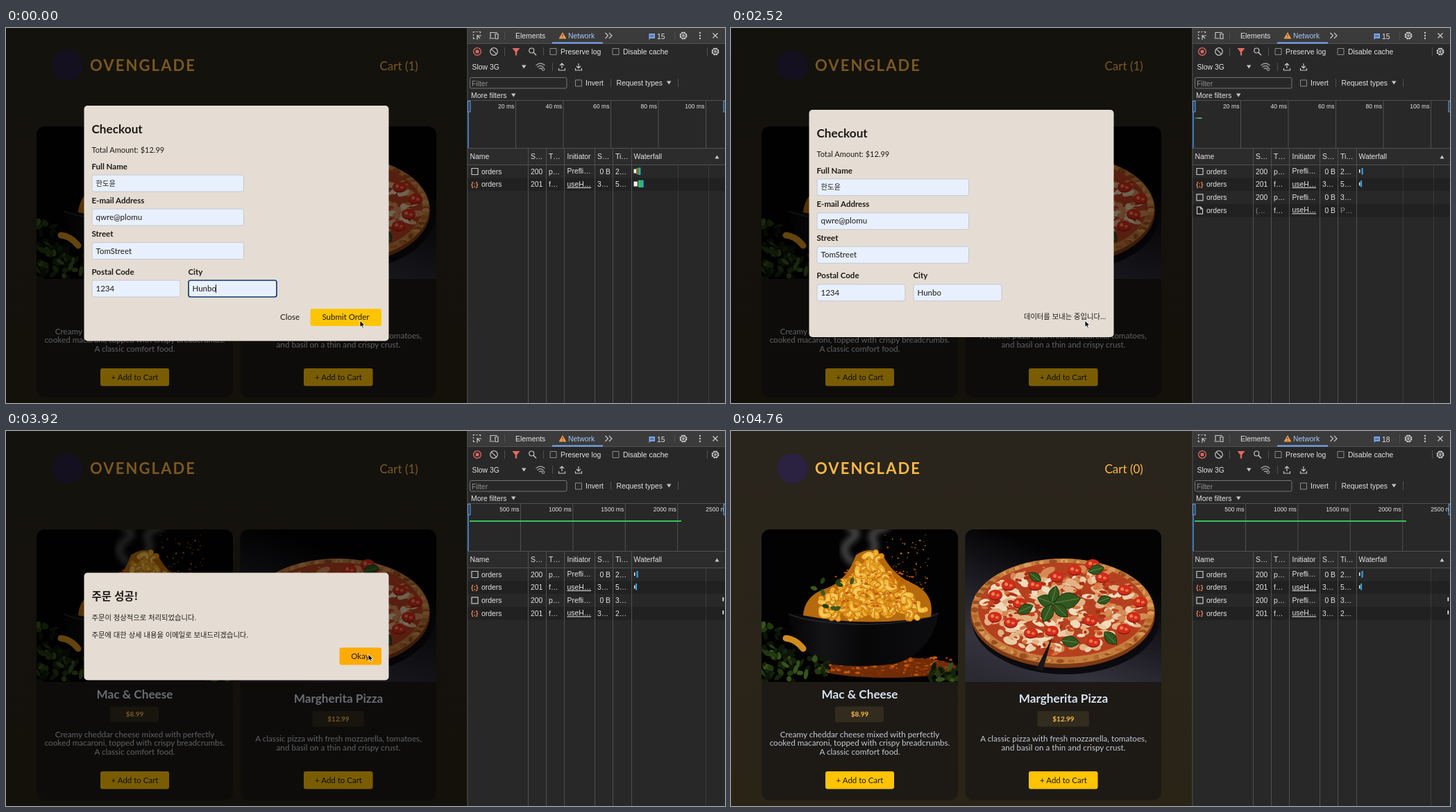
These frames come from a looping animation (1036x541 px, 5110 ms). An HTML page:

```html
<!DOCTYPE html>
<html lang="ko">
<head>
<meta charset="utf-8">
<title>Checkout</title>
<style>
html, body { margin: 0; width: 100%; height: 100%; overflow: hidden; background: #282828; }
svg { display: block; width: 1036px; height: 541px; }
.shop { font: 11.5px Lato, "Noto Sans CJK KR", sans-serif; fill: #d9e2f1; }
.shop .dark { fill: #1d1a16; }
.ko { font-family: "Noto Sans CJK KR", "Noto Sans CJK", sans-serif; font-size: 10.3px; }
.b { font-weight: 700; }
.h { font-size: 17.2px; font-weight: 700; }
.mid { text-anchor: middle; }
.end { text-anchor: end; }
.gold { fill: #ffb847; }
.btn { fill: #ffc404; }
.hover { fill: #ffab06; }
.field { fill: #e8f0fe; stroke: #c5c8ce; }
.dev { font: 10.4px "Liberation Sans", Arial, sans-serif; fill: #e3e3e3; }
.ms { font-size: 8.6px; text-anchor: end; }
.dim { fill: #8f8f8f; }
.ico { fill: none; stroke: #c7c7c7; stroke-width: 1.2; }
.rule { fill: none; stroke: #505050; }
</style>
</head>
<body>
<svg viewBox="0 0 1036 541">
  <defs>
    <linearGradient id="page" x2="0" y2="1"><stop stop-color="#29251c"/><stop offset="1" stop-color="#2a2417"/></linearGradient>
    <linearGradient id="table" x1=".55" y1=".2" x2=".15" y2="1"><stop stop-color="#030304"/><stop offset=".75" stop-color="#34333e"/><stop offset="1" stop-color="#2b2a33"/></linearGradient>
    <linearGradient id="bowl"><stop stop-color="#050506"/><stop offset=".25" stop-color="#141417"/><stop offset=".5" stop-color="#070708"/><stop offset="1" stop-color="#0d0d10"/></linearGradient>
    <filter id="soft"><feGaussianBlur stdDeviation="4"/></filter>
    <clipPath id="pic1"><path d="M44 362V154a12 12 0 0 1 12-12H315a12 12 0 0 1 12 12V362z"/></clipPath>
    <clipPath id="pic2"><path d="M337.500 362V154a12 12 0 0 1 12-12H608a12 12 0 0 1 12 12V362z"/></clipPath>
    <clipPath id="left"><path d="M0 0H664.500V541H0z"/></clipPath>
  </defs>

  <g class="shop" clip-path="url(#left)">
    <rect width="665" height="541" fill="url(#page)"/>
    <circle cx="88.500" cy="54" r="22" fill="#2b2140"/>
    <text class="gold b" x="121" y="62" font-size="22" letter-spacing="2.1">OVENGLADE</text>
    <text class="gold" x="538.500" y="61" font-size="17" id="cart"></text>

    <rect x="44" y="142" width="283" height="391" rx="12" class="dark"/>
    <rect x="337.500" y="142" width="282.500" height="391" rx="12" class="dark"/>
    <g id="mac" clip-path="url(#pic1)"></g>
    <g id="pizza" clip-path="url(#pic2)"></g>

    <g class="mid">
      <text class="h" x="185.500" y="385.500">Mac &amp; Cheese</text>
      <rect x="150" y="397.500" width="70" height="22.500" rx="3" fill="#312c1d"/>
      <text class="gold b" x="185.500" y="412.300" font-size="10">$8.99</text>
      <g font-size="11.7" fill-opacity=".88">
        <text x="185.500" y="441.500">Creamy cheddar cheese mixed with perfectly</text>
        <text x="185.500" y="454.200">cooked macaroni, topped with crispy breadcrumbs.</text>
        <text x="185.500" y="467">A classic comfort food.</text>
        <text x="479" y="448">A classic pizza with fresh mozzarella, tomatoes,</text>
        <text x="479" y="460.700">and basil on a thin and crispy crust.</text>
      </g>
      <rect class="btn" x="136" y="491" width="99" height="25.500" rx="3"/>
      <text class="dark" x="185.500" y="508">+ Add to Cart</text>
      <text class="h" x="479" y="392">Margherita Pizza</text>
      <rect x="441.500" y="404" width="74.500" height="22.500" rx="3" fill="#312c1d"/>
      <text class="gold b" x="479" y="418.800" font-size="10">$12.99</text>
      <rect class="btn" x="429" y="491" width="99.500" height="25.500" rx="3"/>
      <text class="dark" x="479" y="508">+ Add to Cart</text>
    </g>

    <rect id="shade" width="665" height="541" opacity=".52" fill="#000"/>

    <g id="checkout">
      <rect id="sheet" x="112.500" width="439" rx="5" fill="#e5ddd4"/>
      <g id="form">
        <g class="dark">
          <text class="h" x="123.500" y="152">Checkout</text>
          <text x="123.500" y="180" font-size="11">Total Amount: $12.99</text>
          <g class="b">
            <text x="123.500" y="204">Full Name</text>
            <text x="123.500" y="252.500">E-mail Address</text>
            <text x="123.500" y="301.300">Street</text>
            <text x="123.500" y="355.500">Postal Code</text>
            <text x="262.500" y="355.500">City</text>
          </g>
        </g>
        <g class="field">
          <rect x="124" y="212" width="218.500" height="24" rx="3"/>
          <rect x="124" y="261" width="218.500" height="24" rx="3"/>
          <rect x="124" y="309.500" width="218.500" height="24" rx="3"/>
          <rect x="124" y="364" width="127" height="24" rx="3"/>
          <rect x="263" y="364" width="127" height="24" rx="3"/>
        </g>
        <g class="dark">
          <text class="ko" x="129.500" y="227.500">한도윤</text>
          <text x="129.500" y="276.700">qwre@plomu</text>
          <text x="129.500" y="325.500">TomStreet</text>
          <text x="129.500" y="380">1234</text>
          <text x="268.500" y="380">Hunbo</text>
        </g>
      </g>
      <g id="actions" class="mid">
        <rect x="263" y="364" width="127" height="24" rx="3" fill="none" stroke="#173f73" stroke-width="1.700"/>
        <path d="M302.500 370v12" stroke="#111"/>
        <text class="dark" x="409" y="421.300">Close</text>
        <rect id="submit" x="438.500" y="405" width="102.500" height="25" rx="3"/>
        <text class="dark" x="489.500" y="421.300">Submit Order</text>
      </g>
      <text id="sending" class="ko dark end" x="540.500" y="420.300">데이터를 보내는 중입니다...</text>
    </g>

    <g id="success">
      <rect x="112.500" y="204.500" width="439" height="155" rx="5" fill="#e5ddd4"/>
      <text class="ko dark b" x="123.500" y="244" style="font-size:15.400px">주문 성공!</text>
      <text class="ko dark" x="123.500" y="273">주문이 정상적으로 처리되었습니다.</text>
      <text class="ko dark" x="123.500" y="297.600">주문에 대한 상세 내용을 이메일로 보내드리겠습니다.</text>
      <rect id="okay" x="480.500" y="312.500" width="60.500" height="25" rx="3"/>
      <text class="dark mid" x="510.500" y="328.800">Okay</text>
    </g>
  </g>

  <g class="dev">
    <rect x="664.500" width="372" height="541" fill="#282828"/>
    <path d="M664.500 0H1036V22.500H664.500z" fill="#3b3b3b"/>
    <path d="M664.500 174H1036V197.500H664.500z" fill="#2c2c2c"/>
    <path class="rule" d="M665 0V541M665 22.500H1036M665 104.500H1036M665 173.500H1036M665 197.500H1036M718.500 5V17M963.500 5V17M718.500 28V40M774.500 28V40M1010.500 28V40M787.500 50V62M871.500 73V85M968.500 73V85"/>
    <path d="M787 21.500H860" stroke="#7cacf8" stroke-width="2"/>

    <g class="ico">
      <path d="M683 15l-4-4v6M679 11h6M673.500 7v-1.500h2m2 0h2m2 0h2v2M673.500 9v2m0 2v2.500h2"/>
      <path d="M698 14V6.500h10M696.500 15h7M705 8.500h4v7h-4z"/>
      <path d="M863.500 7l4 4-4 4M869 7l4 4-4 4"/>
      <circle cx="976" cy="11" r="4.500" stroke-width="2" stroke-dasharray="2.500 1"/><circle cx="976" cy="11" r="3.800"/><circle cx="976" cy="11" r="1.300"/>
      <circle cx="1022" cy="34" r="4.500" stroke-width="2" stroke-dasharray="2.500 1"/><circle cx="1022" cy="34" r="3.800"/><circle cx="1022" cy="34" r="1.300"/>
      <path d="M1018.500 7.500l7 7m0-7l-7 7" stroke-width="1.400"/>
      <circle cx="703" cy="34" r="5.300"/><path d="M699.300 30.300l7.400 7.400"/>
      <circle cx="757.300" cy="32.500" r="3.500"/><path d="M760 35.200l4 4" stroke-width="1.500"/>
      <path d="M763.500 54q6.500-6 13 0M765.500 56.500q4.500-4 9 0M768 59q2-2 4 0" stroke="#999"/><circle cx="774" cy="59.500" r="1.800" stroke="#999"/>
      <path d="M801 58v-7m-3 3l3-3 3 3M796.500 58v3h9v-3M825 51v7m-3-3l3 3 3-3M820.500 58v3h9v-3"/>
      <path d="M784 29.500h9v9h-9zM874 29.500h9v9h-9zM820.500 75h9v9h-9z" stroke="#8b8b8b" stroke-width="1"/>
    </g>
    <g fill="#c7c7c7"><circle cx="1000" cy="7" r="1.200"/><circle cx="1000" cy="11" r="1.200"/><circle cx="1000" cy="15" r="1.200"/>
      <path d="M743 53.500h6.500l-3.250 5zM952 76.500h6.500l-3.250 5zM728 94.500h6.500l-3.250 5zM1021.500 188.500h6l-3-5z"/></g>
    <path d="M802 6l5.500 9.500h-11z" fill="#f29b4b"/><path d="M802 9v3m0 1v1" stroke="#3a3a3a"/>
    <path d="M926.500 8h8.500v7h-6.500l-2 2z" fill="#7cacf8"/><path d="M928 10.500h5.500m-5.500 2h5.500" stroke="#3a3a3a" stroke-width=".8"/>
    <circle cx="679" cy="34" r="5.400" fill="none" stroke="#e46962" stroke-width="1.300"/><path d="M676.700 31.700h4.600v4.600h-4.600z" fill="#e46962"/>
    <path d="M729.500 29h11l-4.300 5.500v5h-2.400v-5z" fill="#e46962"/>

    <text x="734" y="14.500">Elements</text>
    <text x="810" y="14.500" fill="#a8c7fa">Network</text>
    <text x="938" y="15.700" id="badge"></text>
    <text x="799" y="37.700">Preserve log</text>
    <text x="889" y="37.700">Disable cache</text>
    <text x="671.500" y="60">Slow 3G</text>
    <rect x="668.500" y="71.500" width="139.500" height="15.500" rx="2" fill="#282828" stroke="#757575"/>
    <text class="dim" x="671" y="83.500">Filter</text>
    <text x="835" y="82.700">Invert</text>
    <text x="879.500" y="82.700">Request types</text>
    <text x="670" y="100.800">More filters</text>

    <g id="rulers"></g>
    <path d="M666 105V173" stroke="#3f78b5" stroke-width="2"/>
    <path d="M665.500 105.500h3.500v15.500h-3.500zM1034 105.500h3v15.500h-3z" fill="#263c55" stroke="#6aa5e8"/>
    <g id="blip" stroke-width="2"><path d="M668 130h4" stroke="#43606b"/><path d="M672 130h5" stroke="#3fae5d"/><path d="M677 130h1.500" stroke="#3b9fd0"/></g>
    <path id="longbar" d="M668 130H973" stroke="#38c35a" stroke-width="2"/>

    <g id="rows"></g>
    <path class="rule" d="M752.500 174V541M778.500 174V541M804.500 174V541M848.500 174V541M874.500 174V541M901.500 174V541"/>
    <g id="head"></g>
    <g id="bars0">
      <path d="M904.500 203.500h3.500v6h-3.500zM904.500 221.500h5.500v7h-5.500z" fill="#eee"/>
      <path d="M908.500 202h1.800v9h-1.800z" fill="#c98a2d"/>
      <path d="M911 201.500h2v10.500h-2zM911 219.500h6v10.500h-6z" fill="#35b56a"/>
      <path d="M913 201.500h1.500v10.500h-1.500zM917 219.500h1.800v10.500h-1.800z" fill="#2f9bd8"/>
    </g>
    <g id="bars1">
      <path d="M905 204h1.500v5h-1.500zM905 222.500h1.500v5h-1.500z" fill="#eee"/>
      <path d="M908.500 202h2.300v9.500h-2.300zM907 220h2.200v9.500h-2.200z" fill="#2f9bd8"/>
    </g>
    <path id="bars2" d="M1032.500 240h1.700v5.500h-1.700zM1032.500 259h1.700v5.500h-1.700z" fill="#eee"/>
  </g>

  <path id="arrow" d="M0 0V9.600L2.200 7.600 3.800 11 5.400 10.200 3.900 7H6.900Z" fill="#000" stroke="#fff" stroke-width=".9"/>
  <path id="beam" d="M507.500 420q2 0 2 1.500v5.500q0 1.500-2 1.500m4-8.500q-2 0-2 1.500m0 5.500q0 1.500 2 1.500" fill="none" stroke="#222"/>
</svg>
<script>
const $ = id => document.getElementById(id);
const show = (id, on) => { $(id).style.display = on ? '' : 'none'; };

let seed = 7;
const rnd = (a = 0, b = 1) => {
  seed = (seed * 16807) % 2147483647;
  return a + (b - a) * seed / 2147483647;
};
const many = (n, f) => Array.from({ length: n }, (_, i) => f(i)).join('');
const pick = (...list) => list[Math.floor(rnd(0, list.length))];
const blob = (x, y, rx, ry, fill, turn = 0) =>
  `<ellipse cx="${x}" cy="${y}" rx="${rx}" ry="${ry}" fill="${fill}" transform="rotate(${turn} ${x} ${y})"/>`;
const shape = (d, fill, more = '') => `<path d="${d}" fill="${fill}" ${more}/>`;
const text = (x, y, s, more = '') => `<text x="${x}" y="${y}" ${more}>${s}</text>`;

function herbs(n, x0, x1, y0, y1) {
  return many(n, () => blob(rnd(x0, x1), rnd(y0, y1), rnd(3, 8), rnd(2, 4),
    pick('#15230c', '#22380f', '#0d1608', '#36521c'), rnd(0, 180)));
}

// A curved tube of pasta inside the heap, which widens downwards
function pasta() {
  const depth = Math.sqrt(rnd()), half = 12 + 74 * depth ** 1.4;
  const x = 199 + rnd(-half, half), y = 180 + 84 * depth;
  const curve = 'M-7 3Q0 -9 7 3';
  return `<g transform="translate(${x} ${y}) rotate(${rnd(0, 360)})" fill="none" stroke-linecap="round">` +
    `<path d="${curve}" stroke="#b8690c" stroke-width="8.500"/><path d="${curve}" stroke="${pick('#eda928', '#f4bb3f', '#e0911a')}" stroke-width="7"/>` +
    `<path d="M-5 1Q0 -7 5 1" stroke="#f9d36c" stroke-width="2"/></g>`;
}

$('mac').innerHTML =
  '<rect x="44" y="142" width="283" height="220" fill="#020202"/>' +
  '<path d="M178 192Q152 172 172 158T166 138M190 186Q214 172 205 158T228 138" fill="none" stroke="#777" stroke-width="10" opacity=".6" filter="url(#soft)"/>' +
  many(70, () => blob(rnd(222, 285), rnd(150, 228), rnd(.5, 1.5), rnd(.5, 1.3), pick('#a85a10', '#d27b16', '#7a3d0a'))) +
  blob(225, 341, 100, 15, '#6f2c07') +
  many(130, () => blob(rnd(135, 322), rnd(326, 352), rnd(1, 4), rnd(.8, 2), pick('#a9440b', '#c65b10', '#7d3007'))) +
  shape('M83 264Q90 322 146 337Q190 342 236 336Q289 320 299 263Z', 'url(#bowl)') +
  '<path d="M83 264Q112 277 190 279Q270 277 299 263" fill="none" stroke="#26262a" stroke-width="1.500"/>' +
  shape('M104 266Q106 236 140 226Q168 214 180 179Q201 164 220 181Q234 208 262 220Q294 235 288 268Q196 284 104 266Z', '#b56a0e') +
  many(150, pasta) +
  many(80, () => blob(rnd(150, 270), rnd(200, 255), rnd(1, 3), rnd(.7, 1.6), pick('#bd4c0b', '#d8690e'))) +
  many(9, () => blob(rnd(112, 180), rnd(212, 258), 5, 3, pick('#263e13', '#3c581c'), rnd(0, 180))) +
  '<path d="M79 299Q93 300 104 314" fill="none" stroke="#d18c1e" stroke-width="9" stroke-linecap="round"/>' +
  herbs(45, 44, 92, 312, 361) + herbs(26, 85, 140, 325, 352) + herbs(10, 46, 75, 278, 312) + herbs(24, 287, 327, 338, 360);

const leaf = (x, y, size, turn) =>
  `<g transform="translate(${x} ${y}) rotate(${turn})">` + shape(`M0 0Q${size / 2} ${-size * .6} ${size} 0Q${size / 2} ${size * .6} 0 0`, '#31561f', 'stroke="#1b3512"') +
  `<path d="M1 0H${size - 2}" stroke="#6d9148" stroke-width=".8"/></g>`;
const tomato = (x, y, r) => blob(x, y + 1, r, r * .75, '#8e150d') + blob(x, y, r, r * .7, '#d02c1c') +
  blob(x - r / 3, y - 1, r / 4, r / 4, '#f3834d') + blob(x + r / 3, y + 1, r / 4, r / 5, '#ef7441');
const onPizza = f => {
  const a = rnd(0, 6.283), r = Math.sqrt(rnd());
  return f(478 + 115 * r * Math.cos(a), 258 + 63 * r * Math.sin(a));
};

$('pizza').innerHTML =
  '<rect x="337" y="142" width="284" height="220" fill="url(#table)"/>' +
  blob(482, 272, 135, 79, '#0b0a0e') +
  blob(478, 264, 133, 78, '#7d3a14') + blob(478, 260, 132, 76, '#c57d3e') +
  many(110, i => blob(478 + 127 * Math.cos(i), 260 + 72 * Math.sin(i), rnd(2, 6), rnd(1.5, 4), pick('#d99a58', '#b5682c', '#9a4d20'))) +
  blob(478, 258, 122, 68, '#b5401f') +
  many(230, () => onPizza((x, y) => blob(x, y, rnd(4, 11), rnd(2.5, 6), pick('#e9cda6', '#f0dcbd', '#e3b184', '#d58a55'), rnd(-30, 30)))) +
  many(130, () => onPizza((x, y) => blob(x, y, rnd(1.5, 6), rnd(1, 3), pick('#c2441f', '#aa2f16', '#d6733c'), rnd(-30, 30)))) +
  [[381, 236], [400, 222], [416, 248], [438, 222], [470, 210], [495, 200], [521, 192], [535, 211], [567, 229], [590, 246],
   [518, 273], [580, 268], [566, 285], [522, 304], [432, 291], [403, 276], [380, 268], [462, 288]]
    .map(([x, y]) => tomato(x, y, 10)).join('') +
  leaf(468, 250, 28, -160) + leaf(462, 248, 25, -75) + leaf(466, 248, 38, -10) + leaf(466, 250, 26, 45) + leaf(462, 250, 28, 115) +
  leaf(515, 203, 23, -15) + leaf(430, 205, 20, 35) + leaf(413, 262, 24, -25) + leaf(476, 302, 26, 8) + leaf(538, 290, 25, 45) + leaf(528, 247, 20, -20) +
  shape('M463 297L440 343L449 346Z', '#17151b');

// Time scales: first line position, spacing and step
const ruler = (id, x0, gap, step, grid) => `<g id="${id}">` +
  many(5, i => `<path class="rule" d="M${x0 + gap * i} 105V173"/>` + text(x0 + gap * i - 2, 116, `${step * (i + 1)} ms`, 'class="ms"')) +
  grid.map(x => `<path class="rule" stroke-opacity=".5" d="M${x} 198V541"/>`).join('') + '</g>';
$('rulers').innerHTML = ruler('short', 734.5, 68.5, 20, [968.5, 1012.5]) + ruler('long', 741.5, 75.4, 500, [1008.5]);

const columns = [668.5, 756, 782, 808.5, 852, 878, 904.5];
$('head').innerHTML = ['Name', 'S…', 'T…', 'Initiator', 'S…', 'Ti…', 'Waterfall'].map((s, i) => text(columns[i], 189.3, s)).join('');

const icons = {
  box: '<path class="ico" d="M671 -4.500h9v9h-9z"/>',
  json: text(670, 3.3, '{;}', 'fill="#f0875a" font-size="9.500" font-weight="700"'),
  file: '<path class="ico" d="M671.500 -5h5l3 3v7h-8zM676.500 -5v3h3"/>'
};
function row(id, i, icon, status, type, from, size, time) {
  const grey = s => /^[(P]/.test(s) ? 'class="dim"' : '';
  const link = from === 'useH…' ? 'text-decoration="underline"' : '';
  return `<g id="${id}" transform="translate(0 ${207 + 18.7 * i})">` +
    (i % 2 ? '<path d="M665 -9.300H1036V9.300H665z" fill="#000" opacity=".18"/>' : '') + icons[icon] +
    text(685, 3.7, 'orders') + text(756, 3.7, status, grey(status)) + text(782, 3.7, type) + text(808.5, 3.2, from, link) +
    (size === '0 B' ? text(871, 3.7, size, 'class="end"') : text(852, 3.7, size)) + text(878, 3.7, time, grey(time)) + '</g>';
}
$('rows').innerHTML =
  row('first', 0, 'box', '200', 'p…', 'Prefli…', '0 B', '2…') +
  row('second', 1, 'json', '201', 'f…', 'useH…', '3…', '5…') +
  row('third', 2, 'box', '200', 'p…', 'Prefli…', '0 B', '3…') +
  row('pending', 3, 'file', '(…', 'f…', 'useH…', '0 B', 'P…') +
  row('finished', 3, 'json', '201', 'f…', 'useH…', '3…', '2…');

// Pointer stops as [time, x, y]
const stops = [[0, 510, 422], [3290, 510, 422], [3500, 526, 345], [3640, 537, 301], [3850, 522, 322],
  [4410, 522, 322], [4480, 560, 262], [4550, 590, 188], [4620, 548, 310], [4690, 474, 500], [4760, 474, 560]];
function pointer(t) {
  const i = stops.findIndex(s => s[0] > t);
  if (i < 0) return stops[stops.length - 1].slice(1);
  const [t0, x0, y0] = stops[i - 1], [t1, x1, y1] = stops[i];
  const k = (t - t0) / (t1 - t0);
  return [x0 + (x1 - x0) * k, y0 + (y1 - y0) * k];
}

function draw(time) {
  const t = Math.floor(time % 5110 / 70) * 70;
  const sent = t >= 350, listed = t >= 420, done = t >= 2590, closed = t >= 3990;
  const [x, y] = pointer(t);
  show('shade', !closed);
  show('checkout', !done);
  show('actions', !sent);
  show('sending', sent);
  show('success', done && !closed);
  $('sheet').setAttribute('y', sent ? 118 : 112);
  $('sheet').setAttribute('height', sent ? 328 : 339.5);
  $('form').setAttribute('transform', `translate(0 ${sent ? 5.8 : 0})`);
  $('submit').setAttribute('class', t >= 280 ? 'hover' : 'btn');
  $('okay').setAttribute('class', x > 480 && x < 541 && y > 312 && y < 338 ? 'hover' : 'btn');
  $('cart').textContent = `Cart (${closed ? 0 : 1})`;
  $('badge').textContent = t >= 4060 ? 18 : 15;

  show('short', !done);
  show('long', done);
  show('blip', t >= 490 && !done);
  show('longbar', done);
  show('third', listed);
  show('pending', listed && !done);
  show('finished', done);
  show('bars0', !listed);
  show('bars1', listed);
  show('bars2', done);

  const typing = t >= 840 && t < 2520;
  show('beam', typing);
  show('arrow', !typing && t < 4760);
  $('arrow').setAttribute('transform', `translate(${x} ${y})`);
}

const start = performance.now();
(function tick() {
  draw(performance.now() - start);
  requestAnimationFrame(tick);
})();
</script>
</body>
</html>
```
